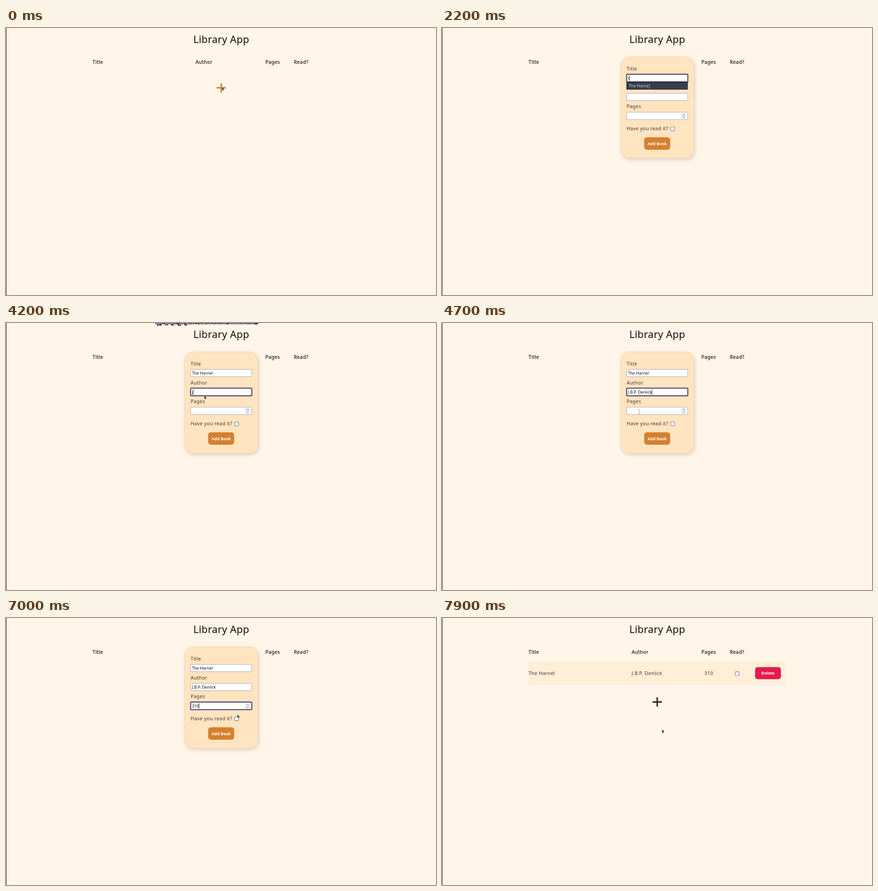
Animation, 949 px wide and 590 px high, one loop 8000 ms. Source, as an HTML page:

```html
<!DOCTYPE html>
<html lang="en">
<head>
<meta charset="utf-8">
<title>Library App</title>
<style>
  html, body { margin: 0; width: 100%; height: 100%; overflow: hidden; background: #fff5e9; }
  svg { display: block; width: 949px; height: 590px; font: 10.7px "Noto Sans", "Open Sans", sans-serif; }
  text { fill: #45362a; letter-spacing: .33px; white-space: pre; }
  .head { fill: #33241a; stroke: #33241a; stroke-width: .28px; letter-spacing: .42px; }
  .mid { text-anchor: middle; }
  .field text, .drop text { font-size: 8.93px; letter-spacing: 0; fill: #111016; }
  .drop text { font-size: 9.1px; fill: #cfd0d8; }
  .btn { font-size: 8.93px; font-weight: 700; letter-spacing: 0; fill: #fff; text-anchor: middle; }
  .box { fill: #fff; stroke: #a8a6ae; }
  .box.hover { stroke: #77757f; }
  .check { fill: #fff; stroke: #8b8d9b; stroke-width: 1.4; }
  .card { fill: #ffe4c0; stroke: #f0d5b2; filter: drop-shadow(2px 4px 4px rgba(70, 45, 15, .16)); }
  .plus { fill: none; stroke-width: 3.2; }
</style>
</head>
<body>
<svg viewBox="0 0 949 590">
  <rect width="949" height="590" fill="#fff5e9"/>
  <rect width="1" height="590" fill="#2d1d40"/>

  <g id="strip">
    <rect x="329.5" y="0" width="227" height="3" fill="#463a68"/>
    <path d="M333 3h4v3h-4zM338 3h5v3h-5zM351 3h7v2h-7zM364 3h7v2.500h-7zM379 3h7v3h-7zM394 3h6v2.500h-6z" fill="#463a68"/>
    <text x="330" y="2.500" style="font-size:11.2px;letter-spacing:0;fill:#f3effa">um dolor sit amet consectetur adipisicing</text>
  </g>

  <text class="head mid" x="475.200" y="33" style="font-size:22px">Library App</text>
  <text class="head" x="191" y="78.700">Title</text>
  <text class="head" x="418.500" y="78.700">Author</text>
  <text class="head mid" x="588.700" y="78.700">Pages</text>
  <text class="head mid" x="651.300" y="78.700">Read?</text>

  <path id="plusHot" class="plus" stroke="#d08433" d="M464.700 132.200h20.600M475 122v20.500"/>

  <g id="row">
    <rect x="191" y="95.500" width="568.500" height="53" fill="#ffeed8"/>
    <text x="191" y="126.200">The Harnel</text>
    <text x="418.500" y="126.200">J.B.P. Denlick</text>
    <text class="mid" x="588.700" y="126.200">310</text>
    <rect class="check" x="647.200" y="118.700" width="8.400" height="8.400" rx="1.300"/>
    <rect x="691" y="108.500" width="57" height="26.800" rx="6" fill="#e41b50"/>
    <text class="btn" x="719.300" y="125.300">Delete</text>
    <path class="plus" stroke="#33241a" d="M464.700 185.600h20.600M475 175.300v20.500"/>
  </g>

  <g id="form">
    <rect class="card" x="394.500" y="63.800" width="161.500" height="223.500" rx="18"/>
    <text x="407.500" y="93.800">Title</text>
    <text x="407.500" y="135.600">Author</text>
    <text x="407.500" y="177.400">Pages</text>
    <text x="407.500" y="226.400">Have you read it?</text>
    <g id="fields"></g>
    <rect x="528" y="187.700" width="11" height="12.800" rx="2" fill="#e9e9ed"/>
    <path d="M531.200 192.400l2.300-2.300 2.300 2.300M531.200 195.900l2.300 2.300 2.300-2.300" fill="none" stroke="#85848e"/>
    <rect class="check" x="504.800" y="218.600" width="8.400" height="8.400" rx="1.300"/>
    <rect x="446.200" y="241.600" width="57.300" height="27.300" rx="6" fill="#d6802e"/>
    <text class="btn" x="474.800" y="259">Add Book</text>
    <g id="drops"></g>
  </g>

  <path id="arrow" d="M0 0v7.800l1.800-1.400 1.400 2.500 1.500-.8-1.200-2.500 1.900-.5z" fill="#44454f" stroke="#d8cfcb" stroke-width=".4"/>
  <path id="beam" d="M-1.500-5h3M0-5v10M-1.500 5h3" fill="none" stroke="#8a8990" stroke-width=".8"/>
</svg>

<script>
const LOOP = 8000, STEP = 100;
const BOOK = "The Harnel", WRITER = "J.B.P. Denlick";
const TOPS = [102.5, 144.3, 186];
const $ = id => document.getElementById(id);

// [time, text] pairs per field, and the span in which it has focus
const typing = [
  [[0, ""], [1700, "t"], [2400, BOOK]],
  [[0, ""], [3400, "j"], [4300, WRITER]],
  [[0, ""], [6100, "3"], [6200, "31"], [6500, "310"]]
];
const focus = [[1200, 2800], [2800, 5000], [5000, LOOP]];
const lists = [[1700, 2400, BOOK], [3400, 4200, WRITER]];

// pointer path: time, x, y
const path = [
  [0, 476.5, 130], [600, 476.5, 130], [700, 477.5, 131], [1200, 455, 110],
  [1700, 455, 110], [2200, 453.5, 124.5], [2400, 453.5, 124.5], [2800, 450, 152],
  [3200, 446, 196], [3300, 446, 196], [3700, 437.5, 160], [4200, 437.5, 160],
  [4700, 435, 196], [4800, 435, 196], [5300, 435, 188], [6700, 435, 188],
  [7000, 510.5, 213], [7200, 512, 219], [7500, 487, 253], [7600, 485.5, 246], [LOOP, 485.5, 246]
];

$("fields").innerHTML = TOPS.map(y => `<g class="field">
  <rect class="ring" x="406.700" y="${y - 1}" width="136.600" height="18.200" rx="2.200" fill="none" stroke="#8d839b" stroke-width="1.400"/>
  <rect class="box" x="407.700" y="${y}" width="134.500" height="16.200" rx="1.200"/>
  <rect class="ring" x="407.800" y="${y}" width="134.400" height="16.200" rx="1.200" fill="none" stroke="#352c58" stroke-width="1.300"/>
  <text x="410.400" y="${y + 11.5}"></text>
  <rect class="caret" y="${y + 2.4}" width="1" height="11.800" fill="#1c1b22"/></g>`).join("");

$("drops").innerHTML = lists.map(([, , name], i) => `<g class="drop">
  <rect x="407.500" y="${TOPS[i] + 17}" width="134.500" height="16.200" fill="#363d4c" stroke="#20242f"/>
  <text x="412" y="${TOPS[i] + 28.2}">${name}</text></g>`).join("");

const fields = [...document.querySelectorAll(".field")];
const drops = [...document.querySelectorAll(".drop")];

const show = (el, on) => { el.style.display = on ? "" : "none"; };
const within = (t, a, b) => t >= a && t < b;

function pointAt(t) {
  const i = path.findIndex(p => p[0] > t);
  const [t0, x0, y0] = path[i - 1], [t1, x1, y1] = path[i];
  const k = (t - t0) / (t1 - t0);
  return [x0 + (x1 - x0) * k, y0 + (y1 - y0) * k];
}

function draw(t) {
  const open = within(t, 700, 7700);
  show($("plusHot"), t < 700);
  show($("form"), open);
  show($("row"), t >= 7700);
  show($("strip"), within(t, 4200, 4300));

  fields.forEach((field, i) => {
    const active = within(t, ...focus[i]);
    const label = field.querySelector("text");
    label.textContent = typing[i].filter(k => k[0] <= t).pop()[1];
    field.querySelectorAll(".ring").forEach(r => show(r, active));
    const caret = field.querySelector(".caret");
    show(caret, active);
    if (open) caret.setAttribute("x", 410.2 + label.getComputedTextLength());
  });
  fields[1].querySelector(".box").classList.toggle("hover", within(t, 700, 800));
  drops.forEach((drop, i) => show(drop, within(t, lists[i][0], lists[i][1])));

  const [x, y] = pointAt(t);
  const overText = open && TOPS.some(top => y > top && y < top + 15.5) && x < 526;
  show($("beam"), overText);
  show($("arrow"), !overText);
  $(overText ? "beam" : "arrow").setAttribute("transform", `translate(${x} ${y})`);
}

const start = performance.now();
function tick() {
  const t = (performance.now() - start) % LOOP;
  draw(Math.floor(t / STEP) * STEP);
  requestAnimationFrame(tick);
}
tick();
</script>
</body>
</html>
```
